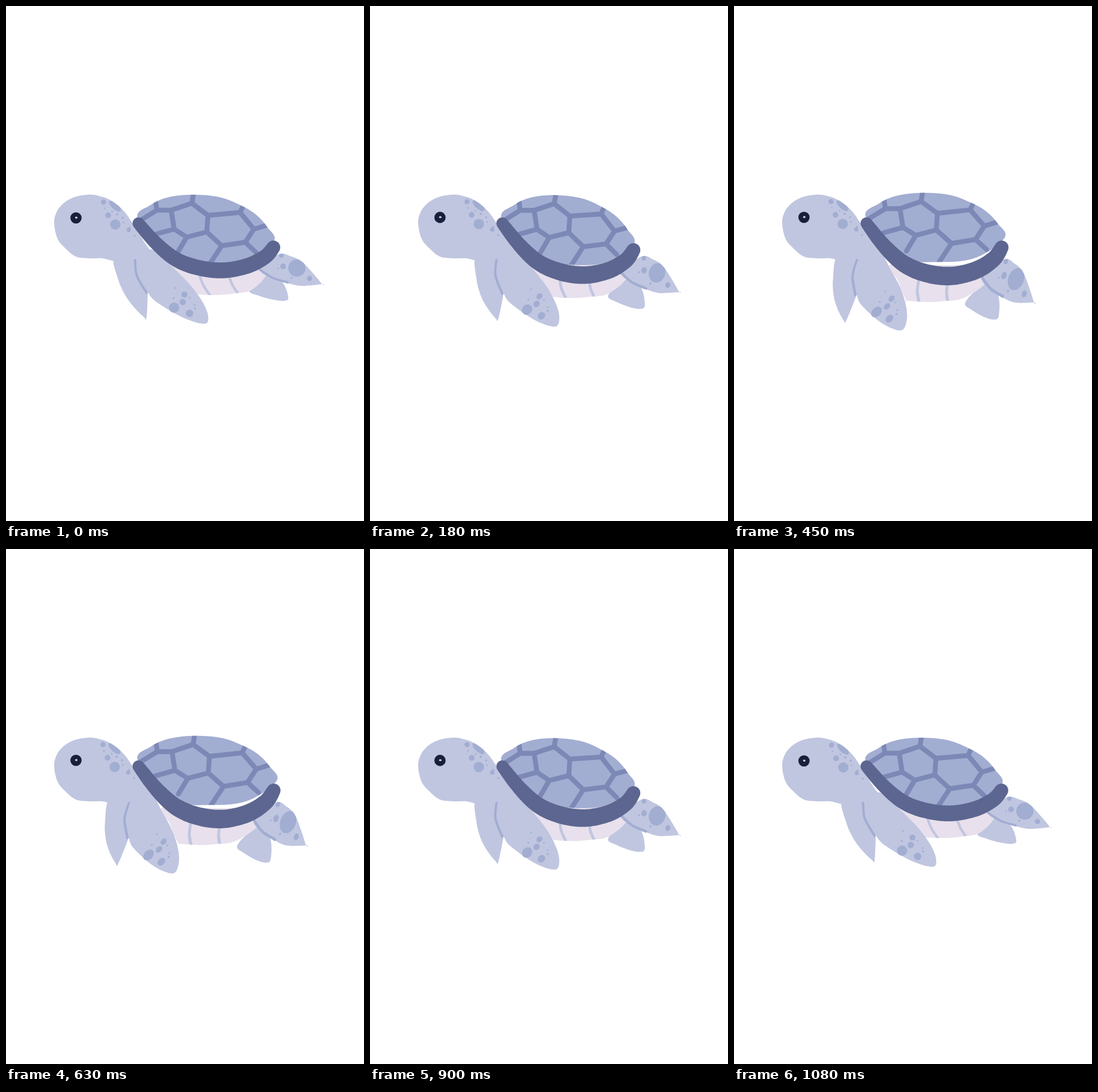
Recreate the animation shown at these times as an HTML page with a canvas. Size 624 by 898 pixels, loop 1.17 s.

```html
<!DOCTYPE html>
<html lang="en">
<head>
<meta charset="utf-8">
<title>Swimming turtle</title>
<style>
  html, body { margin: 0; width: 100%; height: 100%; overflow: hidden; background: #fff; }
  canvas { display: block; }
</style>
</head>
<body>
<canvas id="stage" width="624" height="898"></canvas>
<script>
const ctx = document.getElementById('stage').getContext('2d');
const STEP = 90, STEPS = 13, LAST = 6;
const SKIN = '#c0c6e0', SPOT = '#a2add2', SEAM = '#7c88b5', RIM = '#5c6690', BELLY = '#e8e0ec', EYE = '#171f3b';

const pts = s => s.split(' ').map(p => p.split(',').map(Number));
const mix = (a, b, u) => a + (b - a) * u;

// Resting pose. A repeated point makes a corner.
const torso = pts('84,380 87,362 98,346 117,334 143,329 161,331 181,338 202,354 219,376 240,410 254,436 225,447 190,445 168,440 145,440 122,437 104,423 90,406');
const nearFlipper = pts('226,440 240,425 262,428 290,455 320,485 342,515 352,539 347,554 310,544 262,516 247,499 247,499 234,476');
const farFlipper = pts('189,438 195,475 207,503 222,524 240,542 245,543 247,500 246,470 232,440');
const flipperFold = pts('225,443 228,470 245,500');
const nearFin = pts('443,460 475,433 498,437 516,446 536,467 551,485 551,485 515,488 490,483 468,476');
const farFin = pts('424,497 440,505 465,512 485,514 492,508 482,482 455,465 438,478');
const finFold = pts('443,460 465,474 491,482');
const belly = pts('275,442 300,468 320,490 333,503 333,503 370,504 400,501 424,497 443,483 454,469 454,469 440,440 360,440');
const bellyFold = pts('336,466 344,487 356,505');
const dome = pts('230,372 252,347 285,333 330,329 375,334 412,349 436,364 455,385 467,410 420,443 360,450 290,440');
const rimSpine = pts('231,379 261,413 295,441 334,456 378,461 421,453 452,437 466,421');
const joints = pts('288,356 324,344 352,365 350,394 315,403 293,389 376,418 417,412 432,389 408,360 263,356 234,374 261,342 260,398 299,430 355,450 436,430 456,382 414,347 327,326');
const seams = ['0 1 2 3 4 5 0', '3 6 7 8 9 2', '0 10 11', '10 12', '5 13', '4 14', '6 15', '7 16', '8 17', '9 18', '1 19'];

const headSpots = pts('170,342,4.5 178,365,5 190.5,381,9 214,390.5,3.7');
const flipperSpots = pts('293,526,9 320,536,6.5 308,516,5.5 311,503,5.3');
const finSpots = pts('507,457,15 483,454,5 480,435,4 529,475,4.6');

// How each part leans at the full stroke: pivot, shift, matrix a b c d.
const frontLean = { x: 225, y: 443, dx: -11, dy: 0, m: [.97, .05, -.38, 1.05] };
const hindLean = { x: 443, y: 460, dx: -11, dy: 13, m: [.917, .112, -.321, 1.28] };
const bellyLean = { x: 340, y: 468, dx: -15, dy: 11, m: [1, .04, -.5, 1] };

function lean(part, u, paint) {
  const m = [1, 0, 0, 1].map((v, i) => mix(v, part.m[i], u));
  ctx.save();
  ctx.translate(part.x + part.dx * u, part.y + part.dy * u);
  ctx.transform(...m, 0, 0);
  ctx.translate(-part.x, -part.y);
  paint();
  ctx.restore();
}

// Smooth path through the points.
function trace(p, closed = true) {
  const n = p.length;
  const at = i => closed ? p[(i + n) % n] : p[Math.max(0, Math.min(n - 1, i))];
  ctx.beginPath();
  ctx.moveTo(...p[0]);
  for (let i = 0; i < (closed ? n : n - 1); i++) {
    const [a, b, c, d] = [at(i - 1), at(i), at(i + 1), at(i + 2)];
    ctx.bezierCurveTo(b[0] + (c[0] - a[0]) / 6, b[1] + (c[1] - a[1]) / 6,
      c[0] - (d[0] - b[0]) / 6, c[1] - (d[1] - b[1]) / 6, c[0], c[1]);
  }
}

function fill(p, color) {
  trace(p);
  ctx.fillStyle = color;
  ctx.fill();
}

function curve(p, color, width) {
  trace(p, false);
  ctx.strokeStyle = color;
  ctx.lineWidth = width;
  ctx.stroke();
}

function within(p, paint) {
  ctx.save();
  trace(p);
  ctx.clip();
  paint();
  ctx.restore();
}

function oval(x, y, rx, ry, color, turn = 0) {
  ctx.beginPath();
  ctx.ellipse(x, y, rx, ry, turn, 0, 7);
  ctx.fillStyle = color;
  ctx.fill();
}

const dots = list => list.forEach(([x, y, r]) => oval(x, y, r, r, SPOT));

// Small freckles strewn along a line, the same on every redraw.
function freckles(x0, y0, x1, y1, count, seed) {
  const rand = () => (seed = seed * 16807 % 2147483647) / 2147483647;
  for (let i = 0; i < count; i++) {
    const t = i / (count - 1), r = 1.4 + rand();
    oval(mix(x0, x1, t) + rand() * 6 - 3, mix(y0, y1, t) + rand() * 6 - 3, r, r, SPOT);
  }
}

// Band of round beads, thicker in the middle.
function band(spine, extra, color) {
  const at = i => spine[Math.max(0, Math.min(spine.length - 1, i))];
  const beads = 140;
  ctx.beginPath();
  for (let k = 0; k <= beads; k++) {
    const t = k / beads, s = t * (spine.length - 1), i = Math.min(spine.length - 2, Math.floor(s)), f = s - i;
    const [x, y] = [0, 1].map(j => {
      const [a, b, c, d] = [at(i - 1)[j], at(i)[j], at(i + 1)[j], at(i + 2)[j]];
      return b + f * (c - a + f * (2 * a - 5 * b + 4 * c - d + f * (3 * (b - c) + d - a))) / 2;
    });
    const r = 10.5 + 1.5 * t + (2.5 + extra) * Math.sin(Math.PI * t);
    ctx.moveTo(x + r, y);
    ctx.arc(x, y, r, 0, 7);
  }
  ctx.fillStyle = color;
  ctx.fill();
}

// Widens the shell from its left end and tips its right end.
const warp = (list, grow, tilt, rise) => list.map(([x, y]) => {
  const q = (x - 222) / 256;
  return [x + (x - 222) * grow, y + tilt * q * q - rise];
});

function drawShell(up, p, u) {
  const grow = up ? .02 * p : -.028 * p;
  const tilt = up ? -4 : 5 * p, rise = up ? 2.5 : 0;
  const shape = warp(dome, grow, tilt, rise), j = warp(joints, grow, tilt, rise);
  fill(shape, SPOT);
  within(shape, () => {
    ctx.strokeStyle = SEAM;
    ctx.lineWidth = 8.5;
    for (const seam of seams) {
      ctx.beginPath();
      seam.split(' ').forEach(i => ctx.lineTo(...j[i]));
      ctx.stroke();
    }
  });
  const sag = Math.sqrt(u), end = rimSpine.length - 1;
  const spine = warp(rimSpine, grow - (up ? .018 : 0), Math.max(0, tilt), 0)
    .map(([x, y], i) => [x, y + 10 * sag * Math.sin(Math.PI * i / end)]);
  band(spine, 2.3 * sag, RIM);
}

function drawHead(u) {
  const lift = Math.min(1, u * 2);
  fill(torso, SKIN);
  oval(122, 369.5 - lift, 9.8, 9.8, EYE);
  oval(122.5, 369 - lift, 2.2, 1.7, '#d3d8ec');
  within(torso, () => {
    ctx.translate(-lift, -lift);
    oval(190, 349, 13, 5.5, SPOT, .72);
    dots(headSpots);
    freckles(172, 354, 205, 368, 4, 11);
    freckles(204, 376, 225, 401, 3, 5);
  });
}

function draw(k) {
  // Two strokes of three steps, each with a slow first step.
  const up = k >= 3;
  const p = [0, .28, 1, 1.28][up ? k - 3 : k];
  const u = up ? mix(.55, 1, p) : .43 * p;
  ctx.fillStyle = '#fff';
  ctx.fillRect(0, 0, 624, 898);

  lean(hindLean, u, () => fill(farFin, SKIN));
  lean(bellyLean, u, () => {
    fill(belly, BELLY);
    within(belly, () => {
      for (let i = 0; i < 2; i++) curve(bellyFold.map(([x, y]) => [x + 51 * i, y]), SKIN, 4.5);
    });
  });
  lean(hindLean, u, () => {
    fill(nearFin, SKIN);
    within(nearFin, () => {
      dots(finSpots);
      freckles(475, 459, 497, 473, 2, 3);
    });
    curve(finFold, SPOT, 4);
  });

  lean(frontLean, u, () => fill(farFlipper, SKIN));
  drawHead(u);
  lean(frontLean, u, () => {
    fill(nearFlipper, SKIN);
    curve(flipperFold, SPOT, 4);
    dots(flipperSpots);
    freckles(292, 493, 291, 509, 2, 7);
    freckles(322, 507, 332, 530, 3, 9);
  });
  drawShell(up, p, u);
}

ctx.lineCap = ctx.lineJoin = 'round';
const start = performance.now();
function tick() {
  const i = Math.floor((performance.now() - start) / STEP) % STEPS;
  draw(LAST - Math.abs(LAST - i));
  requestAnimationFrame(tick);
}
tick();
</script>
</body>
</html>
```
